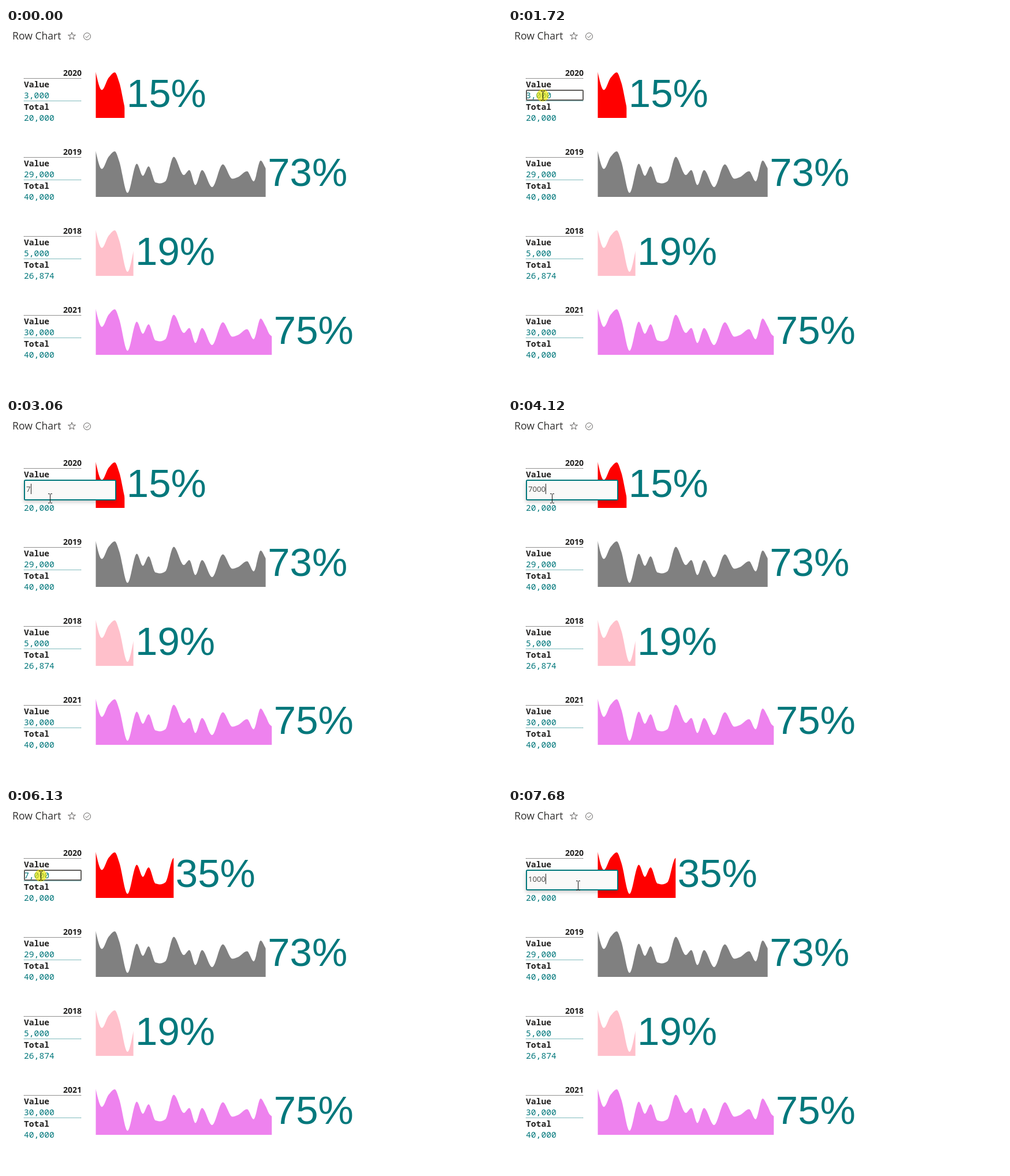
An HTML page for the animation above (8 s loop, 859 px wide and 628 px high).

```html
<!DOCTYPE html>
<html lang="en">
<head>
<meta charset="utf-8">
<title>Row Chart</title>
<style>
  html, body { margin: 0; width: 100%; height: 100%; overflow: hidden; background: #fff; }
  svg { display: block; }
  text { white-space: pre; }
  .title { font: 500 17.6px "Open Sans", "Noto Sans", sans-serif; fill: #323130; }
  .year { font: 700 14px "Open Sans", "Noto Sans", sans-serif; fill: #201f1e; text-anchor: end; }
  .label, .num { font: 14.67px "Noto Sans Mono", "DejaVu Sans Mono", monospace; }
  .label { font-weight: 700; fill: #201f1e; }
  .num, .pct { fill: #03787c; }
  .pct { font: 69px "Liberation Sans", Arial, sans-serif; }
  .entry { font: 13.2px "Open Sans", "Noto Sans", sans-serif; fill: #484644; }
  .icon { fill: none; stroke: #605e5c; }
  #editor { filter: drop-shadow(0 3px 3px rgba(0, 0, 0, .2)); }
</style>
</head>
<body>
<svg id="stage" width="859" height="628" viewBox="0 0 859 628">
  <text class="title" x="11" y="20">Row Chart</text>
  <path class="icon" id="star"/>
  <circle class="icon" cx="140.5" cy="14.5" r="6"/>
  <path class="icon" id="check" d="M137.3 14.6l2.2 2.2 4.3-4.4"/>
  <path class="icon" id="sync" d="M137 14a3.6 3.6 0 0 1 6.4-1.6v-2M143.4 12.4h-2.2M144 15a3.6 3.6 0 0 1-6.4 1.6v2M137.6 16.6h2.2"/>
  <g id="rows"></g>
  <rect id="focus" x="32" y="108" width="98" height="17" rx="1" fill="none" stroke="#605e5c" stroke-width="2"/>
  <path id="bigCaret" d="M601.5 485v76" stroke="#333"/>
  <g id="editor">
    <rect x="32" y="108" width="158" height="34" rx="1.5" fill="#faf9f8" stroke="#03787c" stroke-width="2"/>
    <rect id="selection" x="35" y="114" width="33" height="18" fill="#3390ff"/>
    <text class="entry" id="entry" x="35" y="128"></text>
    <path id="caret" d="M.5 114v18" stroke="#222"/>
  </g>
  <circle id="click" r="10.5" fill="#f2e600" fill-opacity=".65"/>
  <path id="arrow" d="M.5.5v16l3.7-3.5 2.5 5.6 2.4-1-2.5-5.5h5z" fill="#fff" stroke="#222"/>
  <path id="beam" d="M-3.5-7.5h2.5l1 1 1-1h2.5M0-6.5v14M-3.5 8.5h2.5l1-1 1 1h2.5" fill="none" stroke="#111"/>
</svg>
<script>
const LOOP = 8000;
const $ = id => document.getElementById(id);
const clamp = v => Math.max(0, Math.min(1, v));
const show = (id, on) => $(id).style.display = on ? '' : 'none';
const within = (t, a, b) => t >= a && t < b;

// Monotone cubic curve through the points, as an SVG path
function monotone(p) {
  const n = p.length - 1;
  const slope = i => (p[i + 1][1] - p[i][1]) / (p[i + 1][0] - p[i][0]);
  const tangent = p.map((_, i) => {
    if (i === 0 || i === n) return 0;
    const a = slope(i - 1), b = slope(i);
    return a * b <= 0 ? 0 : 2 * a * b / (a + b);
  });
  tangent[0] = 1.5 * slope(0);
  let d = `M${p[0]}`;
  for (let i = 0; i < n; i++) {
    const [x0, y0] = p[i], [x1, y1] = p[i + 1], h = (x1 - x0) / 3;
    d += `C${x0 + h},${y0 + h * tangent[i]} ${x1 - h},${y1 - h * tangent[i + 1]} ${x1},${y1}`;
  }
  return d;
}

const LEFT = 155.3, TOP = 76;
const wave = monotone([
  [155.3, 76], [166, 107.5], [178, 86], [188.5, 77], [196, 94], [210.5, 149],
  [226.5, 98.5], [237, 119.5], [247, 103], [259, 131], [267, 132.5], [276, 129],
  [290.5, 86.5], [308, 118], [317.5, 109.5], [328, 135.5], [339.5, 109.5],
  [357, 139], [375.5, 99.5], [392, 124.5], [402, 121.5], [417.5, 111.5],
  [429, 129], [441, 93], [449.5, 106], [457, 121], [466, 126]
]) + 'V156H155.3Z';

const rows = [
  { year: 2020, value: 3000, total: 20000, color: 'red' },
  { year: 2019, value: 29000, total: 40000, color: 'gray' },
  { year: 2018, value: 5000, total: 26874, color: 'pink' },
  { year: 2021, value: 30000, total: 40000, color: 'violet' }
];
const chartWidth = share => 425 * share - 13.75;
const format = n => n.toLocaleString('en-US');

$('rows').innerHTML = rows.map((r, i) => `
  <g transform="translate(0 ${137 * i})">
    <text class="year" x="131" y="83">${r.year}</text>
    <path d="M31 87.5h100" stroke="#201f1e" stroke-dasharray="1 1"/>
    <text class="label" x="31" y="103">Value</text>
    <text class="num" id="value${i}" x="31" y="122"></text>
    <path d="M31 126.5h100" stroke="#03787c" stroke-dasharray="1 1"/>
    <text class="label" x="31" y="142">Total</text>
    <text class="num" x="31" y="161">${format(r.total)}</text>
    <svg id="chart${i}" x="${LEFT}" y="${TOP}" height="80" viewBox="">
      <path d="${wave}" fill="${r.color}"/>
    </svg>
    <text class="pct" id="pct${i}" y="136.5"></text>
  </g>`).join('');

function setRow(i, value) {
  const share = value / rows[i].total, w = chartWidth(share);
  $('value' + i).textContent = format(value);
  $('chart' + i).setAttribute('width', w);
  $('chart' + i).setAttribute('viewBox', `${LEFT} ${TOP} ${w} 80`);
  $('pct' + i).textContent = Math.round(share * 100) + '%';
  $('pct' + i).setAttribute('x', LEFT + w + 3.5);
}
rows.forEach((r, i) => setRow(i, r.value));

$('star').setAttribute('d', 'M' + Array.from({ length: 10 }, (_, k) => {
  const a = (k / 5 - .5) * Math.PI, r = k % 2 ? 2.7 : 6.8;
  return [(114 + r * Math.cos(a)).toFixed(2), (14.3 + r * Math.sin(a)).toFixed(2)];
}).join('L') + 'Z');

// Pointer stops: time, x, y
const stops = [
  [130, 838, 628], [210, 790, 590], [880, 145, 240], [950, 120, 216], [1020, 69, 167],
  [1430, 60, 117], [2150, 60, 117], [2380, 76, 139], [5560, 76, 139],
  [5830, 60, 117], [6360, 60, 117], [6620, 121, 134], [LOOP, 121, 134]
];
function pointer(t) {
  const i = Math.max(1, stops.findIndex(s => s[0] > t));
  const [t0, x0, y0] = stops[i - 1], [t1, x1, y1] = stops[i];
  const k = clamp((t - t0) / (t1 - t0)), e = k * k * (3 - 2 * k);
  return [x0 + (x1 - x0) * e, y0 + (y1 - y0) * e].map(Math.round);
}

const edits = [
  { open: 1840, close: 4190, old: '3,000', typed: '7000', keys: [3060, 3320, 3460, 3660] },
  { open: 6250, close: LOOP + 999, old: '7,000', typed: '1000', keys: [7020, 7220, 7420, 7680] }
];

function drawEditor(t) {
  const edit = edits.find(e => within(t, e.open, e.close + 100));
  show('editor', edit);
  if (!edit) return;
  const count = edit.keys.filter(k => t >= k).length;
  const k = 1 - (1 - clamp((t - edit.open) / 367)) ** 5;
  $('editor').setAttribute('transform', `translate(0 ${Math.round(20 * (1 - k))})`);
  $('editor').style.opacity = Math.min(k, 1 - clamp((t - edit.close) / 100));
  $('entry').textContent = count ? edit.typed.slice(0, count) : edit.old;
  $('entry').style.fill = count ? '' : '#fff';
  show('selection', !count);
  show('caret', count);
  $('caret').setAttribute('transform', `translate(${35 + Math.round(7.55 * count)} 0)`);
}

function draw(t) {
  const edited = t >= 4330;
  setRow(0, edited ? 7000 : 3000);

  const syncing = within(t, 3660, 4120) || within(t, 4330, 5800);
  show('sync', syncing);
  show('check', !syncing);

  show('bigCaret', within(t, 4660, 5200) || within(t, 5600, 6130));
  show('focus', within(t, 1500, 1900) || within(t, 5870, 6300));
  drawEditor(t);

  const [x, y] = pointer(t);
  const overText = t >= 1400;
  show('arrow', t >= 145 && !overText);
  show('beam', overText);
  show('click', within(t, 1500, 1860) || within(t, 5870, 6270));
  $('arrow').setAttribute('transform', `translate(${x} ${y})`);
  $('beam').setAttribute('transform', `translate(${x + .5} ${y})`);
  $('click').setAttribute('transform', `translate(${x} ${y})`);
}

const start = performance.now();
function tick() {
  draw((performance.now() - start) % LOOP);
  requestAnimationFrame(tick);
}
tick();
</script>
</body>
</html>
```
